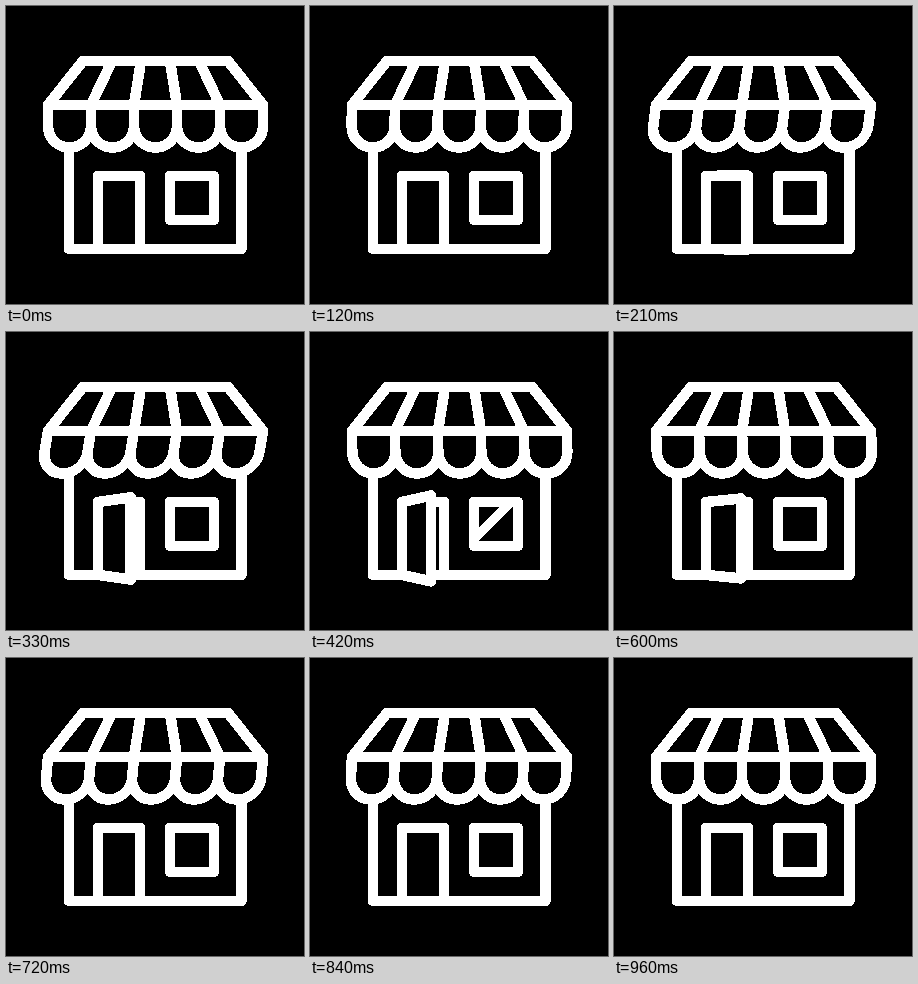
Write an HTML page that moves like this. It is 298x298 px and loops after 1.05 s.

```html
<!DOCTYPE html>
<html>
<head>
<meta charset="utf-8">
<style>
html, body { margin: 0; width: 100%; height: 100%; overflow: hidden; background: #000; }
svg { display: block; width: 100%; height: 100%; }
</style>
</head>
<body>
<svg viewBox="0 0 298 298" fill="none" stroke="#fff" stroke-width="10.6" stroke-linecap="round" stroke-linejoin="round" shape-rendering="crispEdges">
  <clipPath id="pane"><rect x="164" y="170" width="43.8" height="43.8"/></clipPath>
  <path d="M63 141V242.9H235.5V141M92 242.9V170H134V242.9"/>
  <path id="door" fill="#000"/>
  <g clip-path="url(#pane)"><path id="glint" stroke-width="9"/></g>
  <rect x="164" y="170" width="43.8" height="43.8"/>
  <path id="roof"/>
  <path id="awning"/>
</svg>
<script>
const LOOP = 1050, STEP = 30, TOP = 55, EDGE = 99;
const set = (id, d) => document.getElementById(id).setAttribute('d', d);
const linear = p => p;
const smooth = p => (1 - Math.cos(Math.PI * p)) / 2;

// keys: [time, value] pairs in order of time
function track(keys, t, ease) {
  if (t <= keys[0][0]) return keys[0][1];
  for (let i = 1; i < keys.length; i++) {
    const [a, from] = keys[i - 1], [b, to] = keys[i];
    if (t <= b) return from + (to - from) * ease((t - a) / (b - a));
  }
  return keys[keys.length - 1][1];
}

const sway = [[80, 0], [290, -8], [480, 3], [540, 3], [740, -4], [960, 0]];
const opening = [[150, 0], [430, 1], [500, 1], [710, 0]];
const sweep = [[335, 336], [540, 420]];

let roof = `M77 ${TOP}H222L257 ${EDGE}H42Z`;
for (let i = 1; i < 5; i++) roof += `M${77 + 29 * i} ${TOP}L${42 + 43 * i} ${EDGE}`;
set('roof', roof);

let scallops = `M42 ${EDGE}`;
for (let i = 0; i < 5; i++) scallops += `V120a21.5 21.5 0 0 0 43 0V${EDGE}`;
set('awning', scallops);
const awning = document.getElementById('awning');

function draw(now) {
  const t = Math.floor(now % LOOP / STEP) * STEP;

  const k = track(sway, t, smooth) / 42;
  awning.setAttribute('transform', `matrix(1 0 ${k} 1 ${-k * EDGE} 0)`);

  const p = track(opening, t, smooth);
  const x = 134 - 13 * p, dy = 6.5 * p;
  set('door', `M92 170L${x} ${170 - dy}V${242.9 + dy}L92 242.9Z`);

  const s = track(sweep, t, linear);
  set('glint', `M${s - 240} 240L${s - 140} 140`);

  requestAnimationFrame(draw);
}
draw(0);
</script>
</body>
</html>
```
